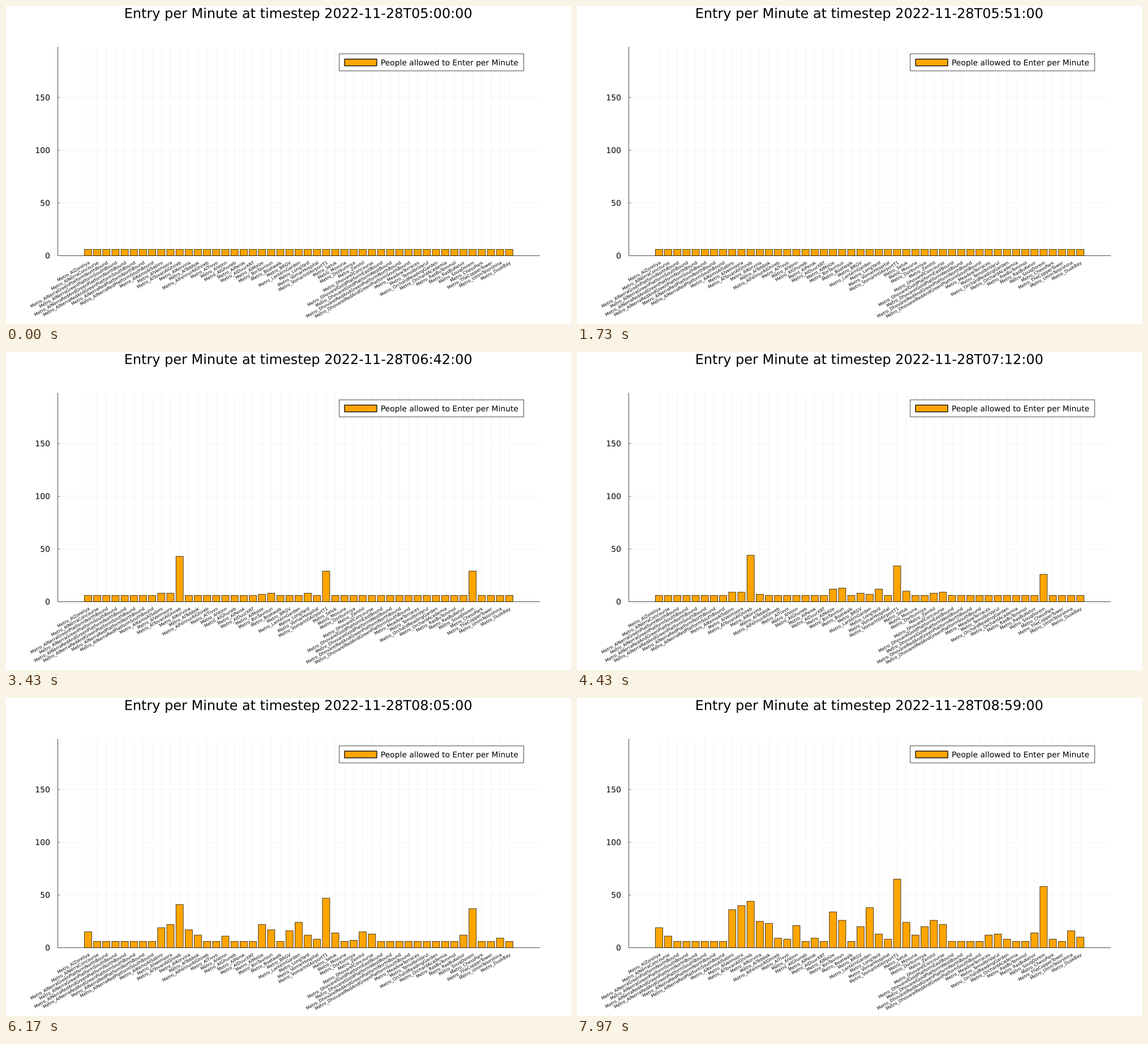
Animation, 998 px wide and 561 px high, one loop 8000 ms. Source, as a matplotlib script:

```python
import matplotlib.pyplot as plt
import numpy as np
from matplotlib.animation import FuncAnimation
from matplotlib.patches import PathPatch, Rectangle
from matplotlib.path import Path
from matplotlib.textpath import TextPath
from matplotlib.transforms import Affine2D

W, H, DPI = 998, 561, 64
FRAMES, LOOP_MS = 240, 8000
LEFT, RIGHT, TOP, BASE = 91.5, 943, 72, 440.5
X0, PITCH, UNIT = 144.9, 16.175, 1.86
QUARTER = 15                      # bars are refreshed every 15 minutes
IDLE = 6
KNOTS = [0, 3, 5, 6, 8, 12, 15]   # quarters at which levels are known

plt.rcParams["font.family"] = "DejaVu Sans"

# Station name, then its levels at the last knots (idle before that)
STATIONS = [
    ("AlZoreliya", 15, 19),
    ("AlNerraConcourse", 11),
    ("AlNerraGreenPlatformNorthBound",),
    ("AlNerraGreenPlatformSouthBound",),
    ("AlNerraRedAndGreenPlatformNorthBound",),
    ("AlNerraRedAndGreenPlatformSouthBound",),
    ("AlNerraRedPlatformNorthBound",),
    ("AlNerraRedPlatformSouthBound",),
    ("AlKemoAlSabiro", 8, 9, 19, 36),
    ("AlVelmoora", 8, 9, 22, 40),
    ("AlTovanAlGhireb", 42, 43, 44, 41, 44),
    ("AlKorvina", 7, 17, 25),
    ("AlTebbok", 12, 23),
    ("AlFennurAlGhireb", 9),
    ("AlTivvo", 8),
    ("AlVonn", 11, 21),
    ("AlGhuneb",),
    ("AlPerok", 9),
    ("AlDuurXRT",),
    ("AlMolze", 7, 12, 22, 34),
    ("BinTavroun", 7, 8, 13, 17, 26),
    ("Boatwalk",),
    ("BRGV", 8, 16, 20),
    ("LanternGarden", 7, 24, 38),
    ("LongYard", 8, 12, 12, 13),
    ("VomarHospital", 8, 8),
    ("VomarIntlAirportT1", 39, 29, 34, 47, 65),
    ("Seluk", 10, 14, 24),
    ("Movuna", 12),
    ("Dorbunniya", 7, 20),
    ("Zemhil", 8, 15, 26),
    ("DhovarelConcourse", 9, 13, 22),
    ("DhovarelGoldPlatformEastBound",),
    ("DhovarelGoldPlatformWestBound",),
    ("DhovarelRedAndGreenPlatformNorthBound",),
    ("DhovarelRedAndGreenPlatformSouthBound",),
    ("MeadowTerraces", 12),
    ("TemoIbnVarul", 13),
    ("OrchardReadingGarden", 8),
    ("OrchardAcademia",),
    ("RasBuTemmol",),
    ("RasBuKelvir", 12, 14),
    ("SouqDorem", 24, 29, 26, 37, 58),
    ("ChessPark", 8),
    ("TheCopperTower",),
    ("UmmTelorshina", 9, 16),
    ("DuskBay", 10),
]
COUNT = len(STATIONS)
centres = X0 + PITCH * np.arange(COUNT)


def pt(px):
    return px * 72 / DPI


def station_levels(values):
    known = [IDLE] * (len(KNOTS) - len(values)) + list(values)
    return np.round(np.interp(np.arange(FRAMES // QUARTER), KNOTS, known))


levels = np.array([station_levels(s[1:]) for s in STATIONS]).T
levels[:11, 0] = IDLE             # the first station wakes up late

fig = plt.figure(figsize=(W / DPI, H / DPI), dpi=DPI, facecolor="white")
ax = fig.add_axes([0, 0, 1, 1])
ax.set_xlim(0, W)
ax.set_ylim(H, 0)
ax.axis("off")


def line(x, y, color="black", width=0.7, z=2):
    ax.plot(x, y, color=color, lw=pt(width), zorder=z, snap=False,
            solid_capstyle="butt")


def box(x, y, w, h, fill, width):
    ax.add_patch(Rectangle((x, y), w, h, fc=fill, ec="black",
                           lw=pt(width), snap=False, zorder=5))


def outline(s, px, x, y, align=0.0, drop=0.0, angle=0):
    """Text outline; align 0, 0.5 or 1 puts its left, middle or right at x."""
    path = TextPath((0, 0), s, size=px)
    ink = path.get_extents()
    place = Affine2D().translate(-ink.x0 - align * ink.width, -drop)
    place.rotate_deg(angle).scale(1, -1).translate(x, y)
    return path.transformed(place)


def ink(path):
    return ax.add_patch(PathPatch(path, fc="black", lw=0, zorder=6))


def title_path(frame):
    hour, minute = divmod(5 * 60 + frame, 60)
    stamp = f"2022-11-28T{hour:02d}:{minute:02d}:00"
    return outline(f"Entry per Minute at timestep {stamp}", 23.96,
                   516.6, 21.2, align=0.5)


# Grid, axes and tick labels
for x in centres:
    line([x, x], [TOP, BASE], "#f3f3f3", 1, z=1)
for value in (0, 50, 100, 150):
    y = BASE - value * UNIT
    if value:
        line([LEFT, RIGHT], [y, y], "#f3f3f3", 1, z=1)
        line([LEFT, LEFT + 4], [y, y], width=0.5)
    ink(outline(str(value), 13.87, 77, y + 4.9, align=1))
line([LEFT, LEFT], [TOP, BASE])
line([LEFT, RIGHT], [BASE, BASE])

names = [outline("Metro_" + s[0], 7.7, x, 449.6, align=1, drop=5.8, angle=30)
         for s, x in zip(STATIONS, centres)]
ink(Path.make_compound_path(*names))

# Legend
box(588.5, 84.3, 326, 30, "white", 0.7)
box(598, 93.6, 57, 12, "orange", 1.3)
ink(outline("People allowed to Enter per Minute", 13.87, 663.2, 104.7))

bars = ax.bar(centres, -levels[0] * UNIT, 0.8 * PITCH, bottom=BASE,
              color="orange", edgecolor="black", linewidth=pt(0.7),
              snap=False, zorder=3)
title = ink(title_path(0))


def update(frame):
    title.set_path(title_path(frame))
    for bar, level in zip(bars, levels[frame // QUARTER]):
        bar.set_height(-level * UNIT)
    return [title, *bars]


anim = FuncAnimation(fig, update, frames=FRAMES, interval=LOOP_MS / FRAMES,
                     repeat=True, repeat_delay=0, blit=False)
plt.show()
```
